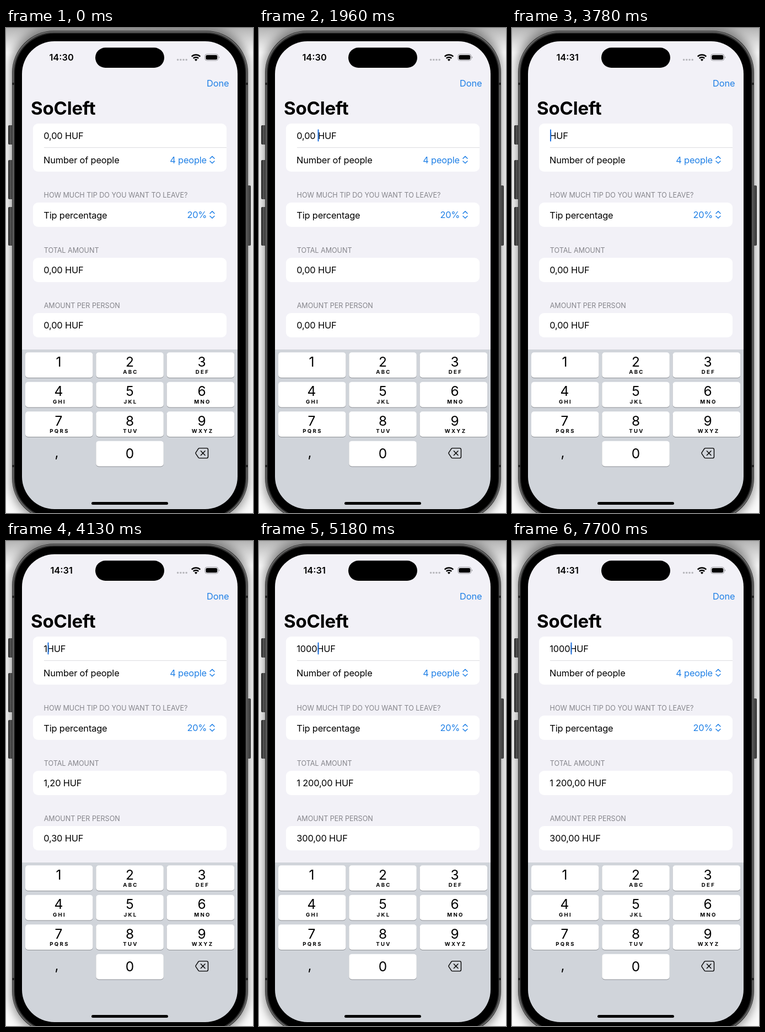
These frames come from a looping animation (448 by 878 pixels, 8000 ms). An HTML page:

```html
<!DOCTYPE html>
<html lang="en">
<head>
<meta charset="utf-8">
<title>Bill splitter</title>
<style>
  html, body { margin: 0; width: 100%; height: 100%; overflow: hidden; background: #fafafa; }
  svg { display: block; width: 448px; height: 878px; }
  text { font: 16.4px Inter, "Liberation Sans", sans-serif; letter-spacing: -.17px; fill: #000; }
  .time { font-weight: 600; text-anchor: middle; letter-spacing: 0; }
  .title { font-size: 33px; font-weight: 700; letter-spacing: -.2px; }
  .caption { font-size: 12.6px; letter-spacing: -.02px; fill: #85858b; }
  .link { fill: #2080e6; text-anchor: end; }
  .arrows { fill: none; stroke: #2080e6; stroke-width: 1.5; stroke-linecap: round; stroke-linejoin: round; }
  .card, .key { fill: #fff; }
  .key.down { fill: #b5c1d1; }
  .shade { fill: #8d9095; }
  .digit { font-size: 24.5px; letter-spacing: 0; text-anchor: middle; }
  .letters { font-size: 9.6px; font-weight: 700; letter-spacing: 2.3px; text-anchor: middle; }
</style>
</head>
<body>
<svg viewBox="0 0 448 878">
  <defs>
    <linearGradient id="side">
      <stop offset="0" stop-color="#222"/>
      <stop offset=".5" stop-color="#555"/>
      <stop offset="1" stop-color="#2a2a2a"/>
    </linearGradient>
    <linearGradient id="top" x2="0" y2="1">
      <stop offset="0" stop-opacity=".28"/>
      <stop offset="1" stop-opacity="0"/>
    </linearGradient>
    <filter id="soft" x="-10%" y="-10%" width="120%" height="120%">
      <feGaussianBlur stdDeviation="9"/>
    </filter>
  </defs>

  <!-- phone body -->
  <rect width="448" height="878" fill="#fafafa"/>
  <rect x="10" y="2" width="429" height="890" rx="70" opacity=".45" filter="url(#soft)"/>
  <rect width="448" height="45" fill="url(#top)"/>
  <g fill="url(#side)">
    <rect x="4" y="176" width="9" height="35" rx="2"/>
    <rect x="4" y="239" width="9" height="71" rx="2"/>
    <rect x="4" y="324" width="9" height="70" rx="2"/>
    <rect x="436" y="285" width="8" height="109" rx="2"/>
  </g>
  <rect x="11" y="5" width="428" height="886" rx="76" fill="#303030"/>
  <rect x="13" y="7" width="424" height="882" rx="74" fill="none" stroke="#686868" stroke-width="2"/>
  <path d="M11 101h6M433 101h6M11 793h6M433 793h6" stroke="#222" stroke-width="4"/>
  <rect x="16" y="10" width="418" height="876" rx="71"/>
  <clipPath id="screen"><rect x="29" y="24" width="391" height="847" rx="59"/></clipPath>
  <g clip-path="url(#screen)">
    <rect x="29" y="24" width="391" height="558" fill="#f2f1f7"/>
    <rect x="29" y="582" width="391" height="289" fill="#d0d4da"/>
  </g>

  <!-- status bar -->
  <rect x="162" y="35.5" width="125" height="36.5" rx="18.2"/>
  <text class="time" id="clock" x="100.6" y="59">14:30</text>
  <path d="M311.6 57.5h16" stroke="#b7b7bc" stroke-width="3.6" stroke-linecap="round" stroke-dasharray="0 5.2"/>
  <g fill="none" stroke="#000" stroke-width="2.5">
    <path d="M336.7 51.6a11.4 11.4 0 0 1 15.6 0"/>
    <path d="M339.7 54.8a7 7 0 0 1 9.6 0"/>
  </g>
  <path d="M344.5 60l-2.7-2.8a4 4 0 0 1 5.4 0z"/>
  <rect x="360.8" y="47.3" width="24" height="11.6" rx="3.7" fill="none" stroke="#96969b"/>
  <rect x="362.4" y="48.9" width="20.8" height="8.4" rx="2.3"/>
  <path d="M386 51.2q2.6 1.9 0 3.8z" fill="#96969b"/>

  <!-- form -->
  <text class="link" x="404.3" y="105.8">Done</text>
  <text class="title" x="45" y="157">SoCleft</text>
  <rect class="card" x="49" y="173" width="351" height="87" rx="9"/>
  <path d="M69 216.5h331" stroke="#dddde0"/>
  <rect class="card" x="49" y="316" width="351" height="44" rx="9"/>
  <rect class="card" x="49" y="416" width="351" height="44" rx="9"/>
  <rect class="card" x="49" y="516" width="351" height="44" rx="9"/>
  <text id="amount" x="68.3" y="201">0,00 HUF</text>
  <text x="68" y="244.8">Number of people</text>
  <text class="link" x="364" y="244.5">4 people</text>
  <text class="caption" x="68.6" y="306.8">HOW MUCH TIP DO YOU WANT TO LEAVE?</text>
  <text x="68.3" y="344.5">Tip percentage</text>
  <text class="link" x="364.3" y="344.3">20%</text>
  <text class="caption" x="68.7" y="406.8">TOTAL AMOUNT</text>
  <text id="total" x="68.3" y="444.2">0,00 HUF</text>
  <text class="caption" x="68.7" y="506.6">AMOUNT PER PERSON</text>
  <text id="share" x="68.3" y="544">0,00 HUF</text>
  <path class="arrows" d="M370 236.2l4-3.8 4 3.8M370 241l4 3.8 4-3.8"/>
  <path class="arrows" d="M370 335.7l4-3.8 4 3.8M370 340.5l4 3.8 4-3.8"/>
  <rect id="caret" y="183.5" width="2" height="22" rx="1" fill="#1c6fdc"/>

  <!-- keypad -->
  <g id="keys"></g>
  <text class="digit" x="92" y="776.5">,</text>
  <g stroke="#000" stroke-width="1.4" stroke-linejoin="round" stroke-linecap="round">
    <path id="erase" d="M351 760.6h12.8q2.7 0 2.7 2.7v12.6q0 2.7-2.7 2.7h-12.8q-1.2 0-2-.9l-4.6-6.8q-.8-1.3 0-2.6l4.6-6.8q.8-.9 2-.9z" fill="none"/>
    <path id="cross" d="M353.4 765.8l7.6 7.6m0-7.6l-7.6 7.6"/>
  </g>
  <rect x="155" y="858" width="139" height="5" rx="2.5"/>
</svg>
<script>
const $ = id => document.getElementById(id);
const LOOP = 8000;
const TICK = 70;

const labels = ['', 'ABC', 'DEF', 'GHI', 'JKL', 'MNO', 'PQRS', 'TUV', 'WXYZ'];
const centers = [95.5, 224.5, 355];

function key(digit, col, row, letters) {
  const x = 35 + col * 128.3;
  const y = 587.3 + row * 53.5;
  const box = cls => `x="${x}" width="122.5" height="45.7" rx="5" class="${cls}"`;
  return `<rect ${box('shade')} y="${y + 1}"/>
    <rect ${box('key')} y="${y}" id="key${digit}"/>
    <text class="digit" x="${centers[col]}" y="${y + (digit ? 25.3 : 31)}">${digit}</text>
    <text class="letters" x="${centers[col] + 1.5}" y="${y + 39}">${letters}</text>`;
}
$('keys').innerHTML = labels.map((l, i) => key(i + 1, i % 3, Math.floor(i / 3), l)).join('') + key(0, 1, 3, '');

// Each track lists [start time, value].
const amount = [[0, '0,00 '], [2520, '0,00'], [2590, '0,0'], [2660, '0'], [2730, ''],
  [4130, '1'], [4760, '10'], [4900, '100'], [5180, '1000']];
const total = [[0, '0,00'], [4130, '1,20'], [4760, '12,00'], [4900, '120,00'], [5180, '1 200,00']];
const share = [[0, '0,00'], [4130, '0,30'], [4760, '3,00'], [4900, '30,00'], [5180, '300,00']];
const caretX = [[0, 139.5], [840, 106.5], [2520, 102.5], [2590, 92], [2660, 78.5], [2730, 69],
  [4130, 75.5], [4760, 85.5], [4900, 96.5], [5180, 106.5]];
const clock = [[0, '14:30'], [3360, '14:31']];
const one = [[0, false], [3990, true], [4130, false]];
const zero = [[0, false], [4620, true], [4760, false], [4830, true], [4900, false], [5110, true], [5180, false]];
const erase = [[0, false], [2940, true], [3290, false]];

const fade = (start, ...levels) => levels.map((v, i) => [start + i * TICK, v]);
const show = start => fade(start, .33, .7, 1);
const hide = start => fade(start, .65, .3, 0);
const caretAlpha = [[0, 0], ...show(140), ...fade(770, .5, .5, 1), ...hide(1470), ...show(1820),
  ...fade(3290, .5, 0), ...show(3640), ...hide(6160), ...fade(6580, .5, 1), ...hide(7210), ...fade(7630, .5, 1)];

const at = (track, t) => track.findLast(([start]) => start <= t)[1];

function draw(t) {
  $('amount').textContent = at(amount, t) + 'HUF';
  $('total').textContent = at(total, t) + ' HUF';
  $('share').textContent = at(share, t) + ' HUF';
  $('clock').textContent = at(clock, t);
  $('caret').setAttribute('x', at(caretX, t));
  $('caret').setAttribute('opacity', at(caretAlpha, t));
  $('key1').classList.toggle('down', at(one, t));
  $('key0').classList.toggle('down', at(zero, t));
  const erasing = at(erase, t);
  $('erase').setAttribute('fill', erasing ? '#000' : 'none');
  $('cross').setAttribute('stroke', erasing ? '#d0d4da' : '#000');
}

const start = performance.now();
function frame() {
  draw((performance.now() - start) % LOOP);
  requestAnimationFrame(frame);
}
draw(0);
requestAnimationFrame(frame);
</script>
</body>
</html>
```
